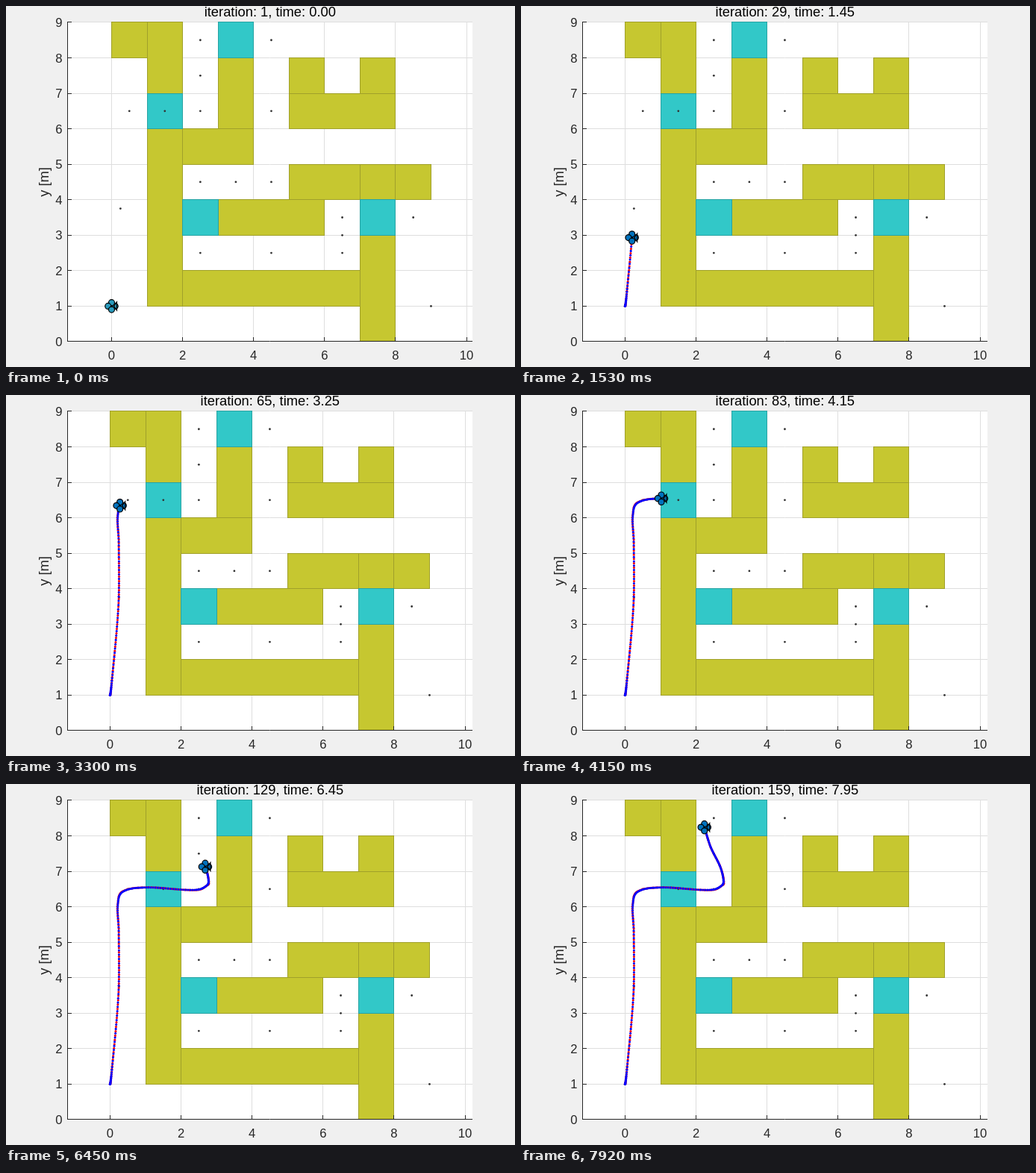
An HTML page with a canvas that plays this animation: 682 px wide and 484 px high, repeating every 7990 ms.

```html
<!DOCTYPE html>
<html>
<head>
<meta charset="utf-8">
<style>
html, body { margin: 0; width: 100%; height: 100%; overflow: hidden; background: #f0f0f0; }
canvas { display: block; }
</style>
</head>
<body>
<canvas id="stage" width="682" height="484"></canvas>
<script>
const ctx = document.getElementById('stage').getContext('2d');
const LOOP = 7990, FIRST = 142, STEP = 76.9, UNIT = 47.555, LAST = 159;
const FONT = '"Liberation Sans", Arial, sans-serif';
const DARK = '#262626';

// Walls are one metre thick: x, y, length
const columns = [[0, 8, 1], [1, 7, 2], [3, 6, 2], [1, 1, 5], [5, 7, 1], [7, 7, 1], [7, 0, 3]];
const rows = [[2, 5, 2], [5, 6, 3], [5, 4, 2], [7, 4, 1], [8, 4, 1], [3, 3, 3], [2, 1, 5]];
const doors = [[3, 8], [1, 6], [2, 3], [7, 3]];
const waypoints = [[2.5, 7.5], [.5, 6.5], [1.5, 6.5], [3.5, 4.5], [.25, 3.75], [8.5, 3.5], [9, 1]];
for (const y of [2.5, 4.5, 6.5, 8.5]) waypoints.push([2.5, y], [4.5, y]);
for (const y of [2.5, 3, 3.5]) waypoints.push([6.5, y]);

// Key poses: iteration, x, y
const keys = [
  [0, 0, 1], [15, .05, 1.4], [34, .235, 3.54], [48, .245, 5.225], [58, .215, 6.03],
  [68, .35, 6.42], [83, 1.02, 6.545], [103, 2.38, 6.475], [114, 2.735, 6.61],
  [120, 2.77, 6.78], [129, 2.68, 7.13], [145, 2.41, 7.69], [LAST, 2.235, 8.24]
];

function slope(i, axis) {
  if (!i) return 0;
  const a = keys[i - 1], b = keys[i + 1] || keys[i];
  return (b[axis] - a[axis]) / (b[0] - a[0]);
}

// Cubic Hermite curve through the key poses
function position(it) {
  let i = 0;
  while (i < keys.length - 2 && keys[i + 1][0] <= it) i++;
  const a = keys[i], b = keys[i + 1], h = b[0] - a[0], u = (it - a[0]) / h, v = 1 - u;
  return [1, 2].map(k =>
    a[k] * (1 + 2 * u) * v * v + b[k] * (3 - 2 * u) * u * u +
    h * u * v * (slope(i, k) * v - slope(i + 1, k) * u));
}

const path = Array.from({ length: LAST + 1 }, (_, i) => position(i));
// The planned position runs half a step ahead and swings wider in turns
const planned = path.map((p, i) => {
  const before = path[Math.max(i - 1, 0)], after = path[Math.min(i + 1, LAST)];
  return p.map((c, k) => c + (after[k] - before[k]) / 4 - 2 * (after[k] - 2 * c + before[k]));
});

let originX;
const X = x => originX + UNIT * x;
const Y = y => 449.95 - UNIT * y;
const crisp = v => Math.floor(v) + .5;

function line(x1, y1, x2, y2, color) {
  ctx.strokeStyle = color;
  ctx.beginPath();
  ctx.moveTo(x1, y1);
  ctx.lineTo(x2, y2);
  ctx.stroke();
}

function circle(x, y, r, fill) {
  ctx.fillStyle = fill;
  ctx.beginPath();
  ctx.arc(x, y, r, 0, 7);
  ctx.fill();
}

function block(x, y, w, h, fill, edge) {
  const left = crisp(X(x)), top = crisp(Y(y + h));
  const rect = [left, top, crisp(X(x + w)) - left, crisp(Y(y)) - top];
  ctx.fillStyle = fill;
  ctx.strokeStyle = edge;
  ctx.fillRect(...rect);
  ctx.strokeRect(...rect);
}

function wall(x, y, w, h) {
  block(x, y, w, h, '#c6c730', '#a0a02a');
}

function text(str, x, y, size, align, color = DARK) {
  ctx.font = size + 'px ' + FONT;
  ctx.textAlign = align;
  ctx.fillStyle = color;
  ctx.fillText(str, x, y);
}

function plot() {
  const grid = '#dedede';
  ctx.fillStyle = '#fff';
  ctx.fillRect(82, 21, 543, 429);
  for (let x = 0; x <= 10; x += 2) line(crisp(X(x)), 21, crisp(X(x)), 450, grid);
  for (let y = 1; y <= 9; y++) line(82, crisp(Y(y)), 625, crisp(Y(y)), grid);

  for (const [x, y, n] of columns) wall(x, y, 1, n);
  for (const [x, y, n] of rows) wall(x, y, n, 1);
  for (const [x, y] of doors) block(x, y, 1, 1, '#32c8c8', '#28a3a3');
  for (const [x, y] of waypoints) circle(X(x), Y(y), 1.4, '#333');

  line(82.5, 21, 82.5, 450, DARK);
  line(82, 449.5, 625, 449.5, DARK);
  for (let x = 0; x <= 10; x += 2) {
    line(crisp(X(x)), 450, crisp(X(x)), 444, DARK);
    text(x, X(x), 474, 16.67, 'center');
  }
  for (let y = 0; y <= 9; y++) {
    line(82, crisp(Y(y)), 88, crisp(Y(y)), DARK);
    text(y, 75.5, Math.round(Y(y)) + 6, 16.67, 'right');
  }
  ctx.save();
  ctx.translate(57, 236);
  ctx.rotate(-Math.PI / 2);
  text('y [m]', 0, 0, 18.33, 'center');
  ctx.restore();
}

function drone(x, y, color) {
  ctx.strokeStyle = '#000';
  ctx.lineWidth = 1.2;
  for (const [dx, dy] of [[1, 0], [0, -1], [-1, 0], [0, 1]]) {
    circle(x + 4.7 * dx, y + 4.7 * dy, 4, color);
    ctx.stroke();
  }
  ctx.beginPath();
  ctx.moveTo(x + 3, y);
  ctx.lineTo(x + 7, y - 5.5);
  ctx.lineTo(x + 7, y + 5.5);
  ctx.closePath();
  ctx.stroke();
  ctx.lineWidth = 1;
}

function trail(points, color) {
  for (const [x, y] of points) circle(X(x), Y(y), 1.55, color);
}

function draw(ms) {
  const step = Math.max(0, Math.floor((ms - FIRST) / STEP) + 1);
  const it = Math.floor(1.565 * step + .08);
  // The view settles two pixels to the left
  originX = 141.47 - Math.min(2, Math.round(step / 10));
  ctx.fillStyle = '#f0f0f0';
  ctx.fillRect(0, 0, 682, 484);
  plot();
  if (it) {
    trail(planned.slice(0, it + 1), '#f00');
    trail(path.slice(0, it + 1), '#00f');
  }
  const [x, y] = path[it];
  drone(X(x), Y(y), it ? '#0072bd' : '#2a9bbd');
  text(`iteration: ${Math.max(1, it)}, time: ${(it * .05).toFixed(2)}`, 353.8, 14, 18.33, 'center', '#000');
}

function frame() {
  draw(performance.now() % LOOP);
  requestAnimationFrame(frame);
}
frame();
</script>
</body>
</html>
```
